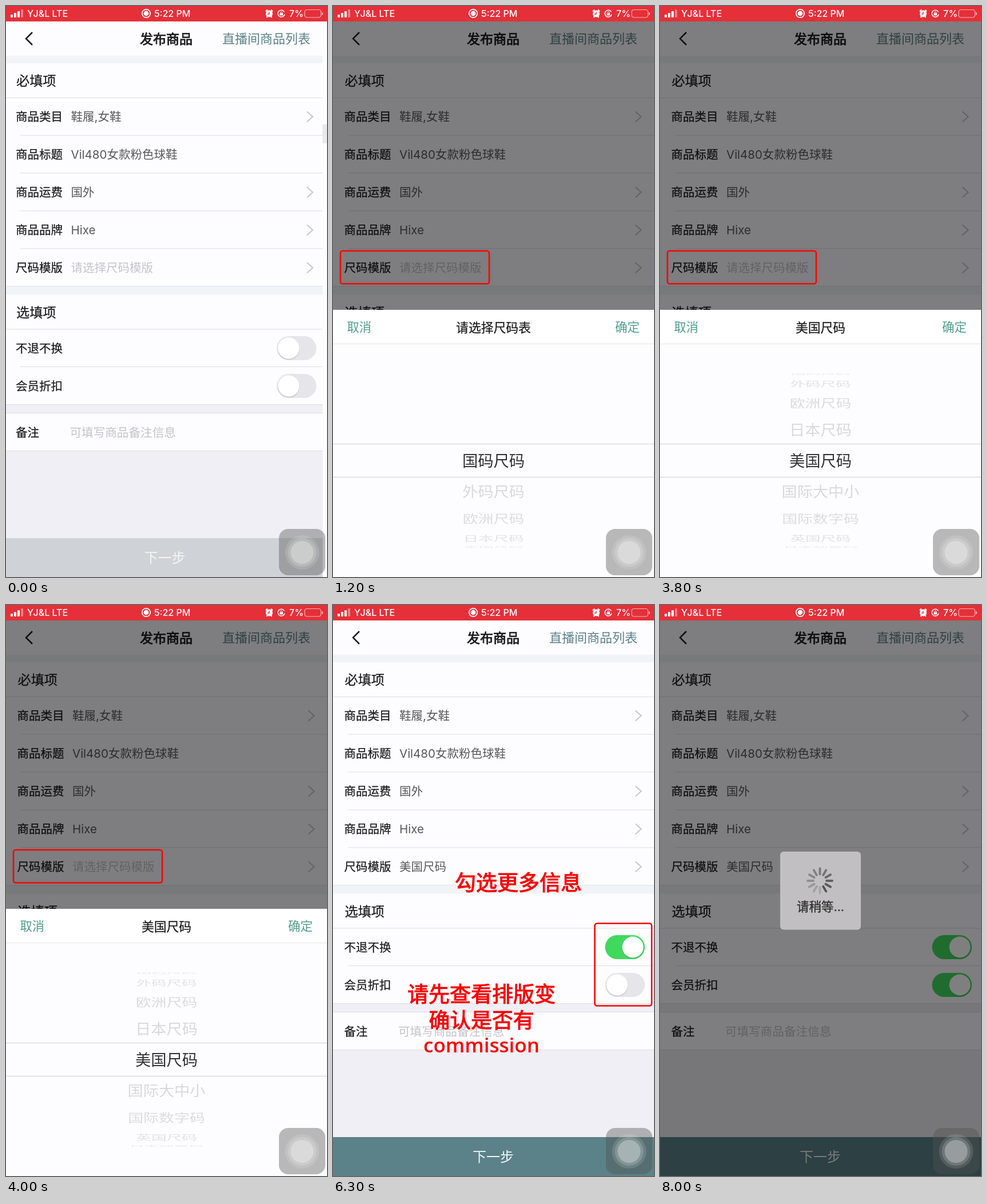
Write an HTML page that moves like this. It is 561 px wide and 998 px high and loops after 8100 ms.

```html
<!DOCTYPE html>
<html lang="zh-CN">
<head>
<meta charset="utf-8">
<style>
html, body { margin: 0; width: 100%; height: 100%; overflow: hidden; background: #fff; }
svg { display: block; width: 100vw; height: 100vh; font-family: Inter, "Noto Sans CJK SC", "Noto Sans CJK", sans-serif; }
</style>
</head>
<body>
<svg id="stage" viewBox="0 0 561 998"></svg>
<script>
const LOOP = 8100, STEP = 100;
const RED = '#e53039', MARK = '#f80404', TEAL = '#5a8288', LINK = '#4f9d8c', INK = '#1c1c1e', GREY = '#58585b', HINT = '#c4c4c8';
const SIZES = ['国码尺码', '外码尺码', '欧洲尺码', '日本尺码', '美国尺码', '国际大中小', '国际数字码', '英国尺码', '日本幼童码'];
const PICK = 4;

const clamp = u => Math.max(0, Math.min(1, u));
const smooth = (t, start, dur) => { const u = clamp((t - start) / dur); return u * u * (3 - 2 * u); };

const rect = (x, y, w, h, fill, more = '') => `<rect x="${x}" y="${y}" width="${w}" height="${h}" fill="${fill}" ${more}/>`;
const disc = (x, y, r, fill, more = '') => `<circle cx="${x}" cy="${y}" r="${r}" fill="${fill}" ${more}/>`;
const path = (d, stroke, width, more = '') => `<path d="${d}" fill="none" stroke="${stroke}" stroke-width="${width}" ${more}/>`;
// Text is placed by its visual middle line.
const text = (x, cy, size, str, fill = INK, more = '') =>
  `<text x="${x}" y="${cy + size * 0.37}" font-size="${size}" fill="${fill}" ${more}>${str}</text>`;
const mid = 'text-anchor="middle"';
// A thin outline gives the weights between regular and bold.
const heavy = (color, width) => `stroke="${color}" stroke-width="${width}"`;
const rule = (x, y) => rect(x, y, 570 - x, 1, '#dedee1');
const frame = (x, y, w, h) => rect(x, y, w, h, 'none', `rx="4" stroke="${MARK}" stroke-width="2.6"`);
const caption = (x, cy, size, str) => text(x, cy, size, str, MARK, mid + ' ' + heavy(MARK, 1.1));

function statusBar() {
  let s = rect(0, 0, 561, 27, RED);
  [5, 8, 11, 14].forEach((h, i) => s += rect(8 + i * 6, 20 - h, 4, h, '#fff', `rx="1" opacity="${i < 3 ? 1 : 0.4}"`));
  s += text(37, 13.5, 16, 'YJ&amp;L LTE', '#fff', 'font-weight="500"');
  s += disc(245, 13, 7.2, 'none', 'stroke="#fff" stroke-width="1.7"') + disc(245, 13, 4.4, '#fff');
  s += text(259, 13.5, 16, '5:22 PM', '#fff', 'font-weight="500"');
  s += disc(460, 13.5, 6, '#fff') + path('M454 9.5l3-3M466 9.5l-3-3M455.5 20l1.5-2M464.5 20l-1.5-2', '#fff', 2.2);
  s += path('M460 10v4h-3', RED, 1.3);
  s += path('M486.5 10.5a6 6 0 1 0 .5 4', '#fff', 1.5) + rect(478.5, 12.5, 5.5, 4, '#fff');
  s += path('M479.7 13v-1.5a1.6 1.6 0 0 1 3.2 0v1.5', '#fff', 1);
  s += text(495, 13.5, 16, '7%', '#fff', 'font-weight="500"');
  s += rect(522, 6.5, 28.5, 13.5, 'none', 'rx="4" stroke="#fff" stroke-opacity=".65" stroke-width="1.2"');
  return s + rect(552, 11, 1.8, 5, '#fff', 'rx="1" opacity=".65"');
}

const toggle = (y, on) =>
  rect(475.5, y - 21, 69.5, 42, on ? '#41d95d' : '#e6e5e9', 'rx="21"') +
  disc(496.5 + 27.5 * on, y + 2, 19, '#000', 'opacity=".08"') + disc(496.5 + 27.5 * on, y, 18.5, '#fff');

function form(t) {
  const chosen = t >= 4100;
  const rows = [
    ['商品类目', '鞋履,女鞋', 1], ['商品标题', 'Vil480女款粉色球鞋', 0], ['商品运费', '国外', 1],
    ['商品品牌', 'Hixe', 1], ['尺码模版', chosen ? SIZES[PICK] : '请选择尺码模版', 1]
  ];
  const label = (y, str) => text(19.5, y, 20.5, str, INK, heavy(INK, 0.25));
  const section = (y, str) => text(20.5, y, 23.2, str, INK, heavy(INK, 0.25));
  let s = rect(-5, 87, 575, 911, '#f0eff5') + rect(-5, 87, 575, 13, '#f1f4f6');
  s += rect(-5, 100, 575, 390, '#fdfcff') + section(130.5, '必填项') + rule(-5, 160);
  rows.forEach(([name, value, arrow], i) => {
    const y = 193.5 + i * 66;
    s += label(y, name) + text(116, y, 20.5, value, i == 4 && !chosen ? HINT : GREY);
    if (arrow) s += path(`M528.5 ${y - 9}l10 9l-10 9`, '#c9c9cd', 2.2);
    s += rule(i < 4 ? 26.5 : -5, 225.5 + i * 66);
  });
  s += rect(-5, 490.5, 575, 14, '#f1f4f6') + rect(-5, 504.5, 575, 192, '#fdfcff');
  s += section(535.5, '选填项') + rule(-5, 564.5);
  s += label(598, '不退不换') + rule(26.5, 630) + label(664, '会员折扣') + rule(-5, 696);
  s += toggle(598, smooth(t, 5400, 250)) + toggle(664, smooth(t, 6700, 250));
  s += rule(-5, 711) + rect(-5, 712, 575, 65, '#fdfcff') + rule(-5, 777);
  s += label(745, '备注') + text(114, 745, 20.6, '可填写商品备注信息', HINT);
  return s + rect(-5, 930, 575, 68, chosen ? TEAL : '#cfd3d7') + text(280, 964, 24, '下一步', '#f4f6f7', mid);
}

function header() {
  return rect(0, 27, 561, 60, '#fdfcff') + path('M46 46l-11 11l11 11', INK, 2.5) +
    text(280, 57, 23, '发布商品', INK, mid + ' ' + heavy(INK, 0.8)) + text(378, 56.8, 22, '直播间商品列表', TEAL);
}

function wheel(t) {
  const left = 1 - clamp((t - 1360) / 1200), pos = PICK * (1 - left * left);
  const items = SIZES.map((name, i) => {
    const a = (i - pos) * 20.75 * Math.PI / 180, c = Math.cos(a);
    if (Math.abs(a) > 1.52) return '';
    return `<g transform="translate(280.5 ${264 + 152.4 * Math.sin(a)}) scale(${0.95 + 0.05 * c} ${c})" opacity="${0.5 + 0.5 * c}">` +
      text(0, 0, 27.3, name, '#1c1c1e', mid) + '</g>';
  }).join('');
  const settled = left == 0 || left == 1;
  return `<clipPath id="band"><rect y="235" width="561" height="58"/></clipPath>` +
    `<clipPath id="rest"><path d="M0 60H561V235H0zM0 293H561V467H0z"/></clipPath>` +
    `<g clip-path="url(#rest)" opacity=".16">${items}</g>` +
    `<g clip-path="url(#band)" opacity="${settled ? 0.9 : 0.38}">${items}</g>`;
}

function sheet(t, up) {
  let s = rect(0, 0, 561, 480, '#fdfcfe') + rect(0, 0, 561, 59, '#fff') + rect(0, 59, 561, 1, '#e6e6e9');
  s += text(24.5, 30.5, 21.3, '取消', LINK) + text(493, 30.5, 21.5, '确定', LINK);
  s += text(280.5, 30.5, 21.8, t < 2700 ? '请选择尺码表' : SIZES[PICK], INK, mid + ' ' + heavy(INK, 0.25));
  s += wheel(t) + rect(0, 234, 561, 1, '#cfcfd3') + rect(0, 292, 561, 1, '#cfcfd3');
  return `<g transform="translate(0 ${998 - 467 * up})">${s}</g>`;
}

function loader(t) {
  const head = Math.floor((t - 8000) * 12 / 1000) + 5;
  let s = rect(210, 431, 141, 136.5, '#c1bfc2', 'rx="6"');
  for (let i = 0; i < 12; i++) {
    const age = ((head - i) % 12 + 12) % 12;
    s += path('M279.5 470.5V460.5', '#333', 3.8, `stroke-linecap="round" opacity="${0.78 - age * 0.055}" transform="rotate(${i * 30} 279.5 482)"`);
  }
  return s + text(280.5, 527.5, 21.5, '请稍等...', '#333', mid + ' ' + heavy('#333', 0.4));
}

function notes(t) {
  let s = '';
  if (t >= 500 && t < 4100) s += frame(13, 428, 260, 57.5);
  if (t >= 4500 && t < 7300) s += frame(457.5, 556.5, 99.5, 144) + caption(324, 485.5, 37, '勾选更多信息');
  if (t >= 5800 && t < 7300) {
    s += caption(259.5, 680.5, 37, '请先查看排版变') + caption(259.5, 725, 36.8, '确认是否有');
    s += text(259.5, 769.5, 35, 'commission', MARK, mid + ' font-weight="600" font-family="Open Sans, Noto Sans, sans-serif"');
  }
  return s;
}

function touchButton() {
  return rect(477, 914, 81, 81, '#505052', 'rx="16" opacity=".4"') +
    [[30, 0.12], [25, 0.16], [20, 0.28]].map(([r, a]) => disc(517.5, 955, r, '#fff', `opacity="${a}"`)).join('');
}

function draw(t) {
  const up = smooth(t, 792, 400) - smooth(t, 4000, 300);
  const wait = smooth(t, 7400, 250);
  const shifted = t < 300;
  let s = `<g transform="translate(${shifted ? -2.5 : 0} 0)">${form(t)}</g>`;
  if (shifted) s += rect(553.5, 87, 8, 911, '#fdfcfe') + rect(553, 207, 8, 33, '#e9e8eb');
  s += header() + rect(0, 27, 561, 971, '#000', `opacity="${0.5 * Math.max(up, wait)}"`);
  if (up > 0) s += sheet(t, up);
  if (wait > 0) s += `<g opacity="${wait}">${loader(t)}</g>`;
  return s + notes(t) + statusBar() + touchButton();
}

const stage = document.getElementById('stage');
const began = performance.now();
let shown = -1;
function tick() {
  const t = Math.floor((performance.now() - began) % LOOP / STEP) * STEP;
  if (t !== shown) stage.innerHTML = draw(shown = t);
  requestAnimationFrame(tick);
}
tick();
</script>
</body>
</html>
```
